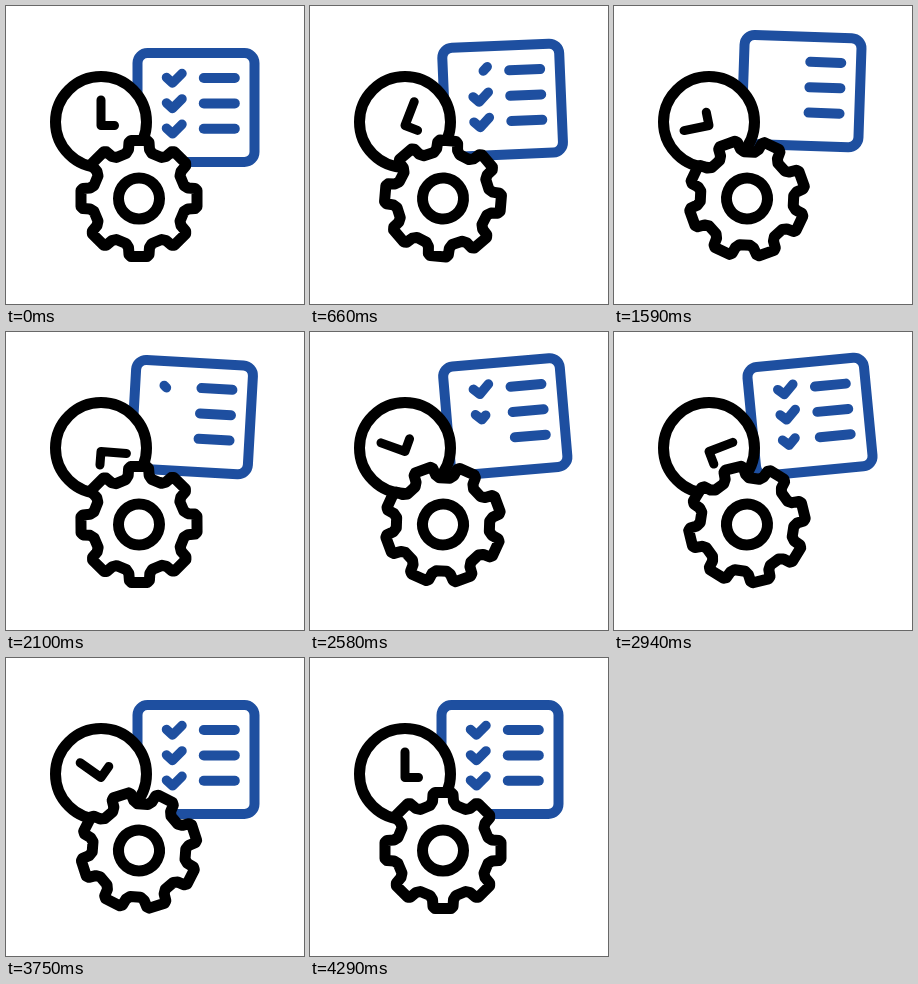
An HTML page that plays this animation: 298 by 298 pixels, repeating every 4890 ms.

```html
<!DOCTYPE html>
<html lang="en">
<head>
<meta charset="utf-8">
<title>Planning icon</title>
<style>
html, body { margin: 0; width: 100%; height: 100%; overflow: hidden; background: #fff; }
svg { display: block; width: 100vw; height: 100vh; }
.ink { fill: #fff; stroke: #000; stroke-width: 11; stroke-linecap: round; stroke-linejoin: round; }
.blue { fill: none; stroke: #1e4fa0; stroke-width: 10; stroke-linecap: round; stroke-linejoin: round; }
.hands { fill: none; stroke-width: 9; }
.check { stroke-width: 9.5; }
</style>
</head>
<body>
<svg viewBox="0 0 298 298">
  <g id="sheet" class="blue">
    <rect x="131.5" y="47" width="117" height="109" rx="10"/>
  </g>
  <circle class="ink" cx="95" cy="116" r="45.5"/>
  <path id="hands" class="ink hands" d="M95 94V119.5H108.5"/>
  <g id="gear" class="ink">
    <path id="rim"/>
    <circle cx="133" cy="192.5" r="20.5"/>
  </g>
</svg>
<script>
const LOOP = 4890, STEP = 30, START = 330, END = 4290;
const CHECK_TIME = 500, CHECK_LAG = 300, ERASE = 330, DRAW = 1980;
const GEAR = { x: 133, y: 192.5 };
const byId = id => document.getElementById(id);
const sheet = byId('sheet'), hands = byId('hands'), gear = byId('gear');

// Sheet poses: time, x shift, y shift, angle
const poses = [
  [330, 0, 0, 0], [1050, 6, -16.8, -5.5], [1890, -6, -16.3, 5],
  [2700, 6, -16.8, -5.5], [2940, 6, -16.8, -5.5], [3330, 0, 0, 0]
];

// Cubic Bezier timing with flat ends; thirds give a smoothstep
function ease(t, from, to, x1 = 1 / 3, x2 = 2 / 3) {
  const x = Math.min(1, Math.max(0, (t - from) / (to - from)));
  let low = 0, high = 1, s = x;
  for (let i = 0; i < 24; i++) {
    const r = 1 - s;
    if (3 * s * r * r * x1 + 3 * s * s * r * x2 + s * s * s < x) low = s;
    else high = s;
    s = (low + high) / 2;
  }
  return s * s * (3 - 2 * s);
}

function addPath(d, cls) {
  const path = document.createElementNS('http://www.w3.org/2000/svg', 'path');
  path.setAttribute('d', d);
  path.setAttribute('class', cls);
  sheet.append(path);
  return path;
}

const checks = [72, 97.4, 122.8].map(y => {
  addPath(`M197.8 ${y}H228.8`, 'line');
  const check = addPath(`M160.5 ${y - 0.5}l6 5.5 9.5 -9.5`, 'blue check');
  check.setAttribute('pathLength', 1);
  return check;
});

function gearPath() {
  const tooth = [[-13, -45], [-10.5, -49], [-10, -56], [-8, -58], [8, -58], [10, -56], [10.5, -49], [13, -45]];
  const points = [];
  for (let i = 0; i < 8; i++) {
    const c = Math.cos(i * Math.PI / 4), s = Math.sin(i * Math.PI / 4);
    for (const [x, y] of tooth) {
      points.push(`${(GEAR.x + x * c - y * s).toFixed(2)} ${(GEAR.y + x * s + y * c).toFixed(2)}`);
    }
  }
  return `M${points.join('L')}Z`;
}
byId('rim').setAttribute('d', gearPath());

function sheetPose(t) {
  const next = poses.findIndex(p => p[0] > t);
  if (next < 1) return [0, 0, 0];
  const a = poses[next - 1], b = poses[next], k = ease(t, a[0], b[0]);
  return [1, 2, 3].map(i => a[i] + (b[i] - a[i]) * k);
}

function trim(path, from, to) {
  const length = to - from;
  path.style.visibility = length > 0.01 ? 'visible' : 'hidden';
  path.setAttribute('stroke-dasharray', length > 0.99 ? 'none' : `${length} 2`);
  path.setAttribute('stroke-dashoffset', -from);
}

function render(t) {
  const handTurn = 1080 * ease(t, START, END);
  const gearTurn = 360 * ease(t, START, END, 0.42, 0.65);
  hands.setAttribute('transform', `rotate(${handTurn} 95 119.5)`);
  gear.setAttribute('transform', `rotate(${gearTurn} ${GEAR.x} ${GEAR.y})`);
  const [x, y, angle] = sheetPose(t);
  sheet.setAttribute('transform', `translate(${x} ${y}) rotate(${angle} 190 101.5)`);
  checks.forEach((check, i) => {
    const lag = i * CHECK_LAG;
    const gone = ease(t, ERASE + lag, ERASE + lag + CHECK_TIME);
    const drawn = ease(t, DRAW + lag, DRAW + lag + CHECK_TIME);
    if (t < DRAW) trim(check, gone, 1);
    else trim(check, 0, drawn);
  });
}

const origin = performance.now();
function tick() {
  const t = (performance.now() - origin) % LOOP;
  render(Math.floor(t / STEP) * STEP);
  requestAnimationFrame(tick);
}
tick();
</script>
</body>
</html>
```
